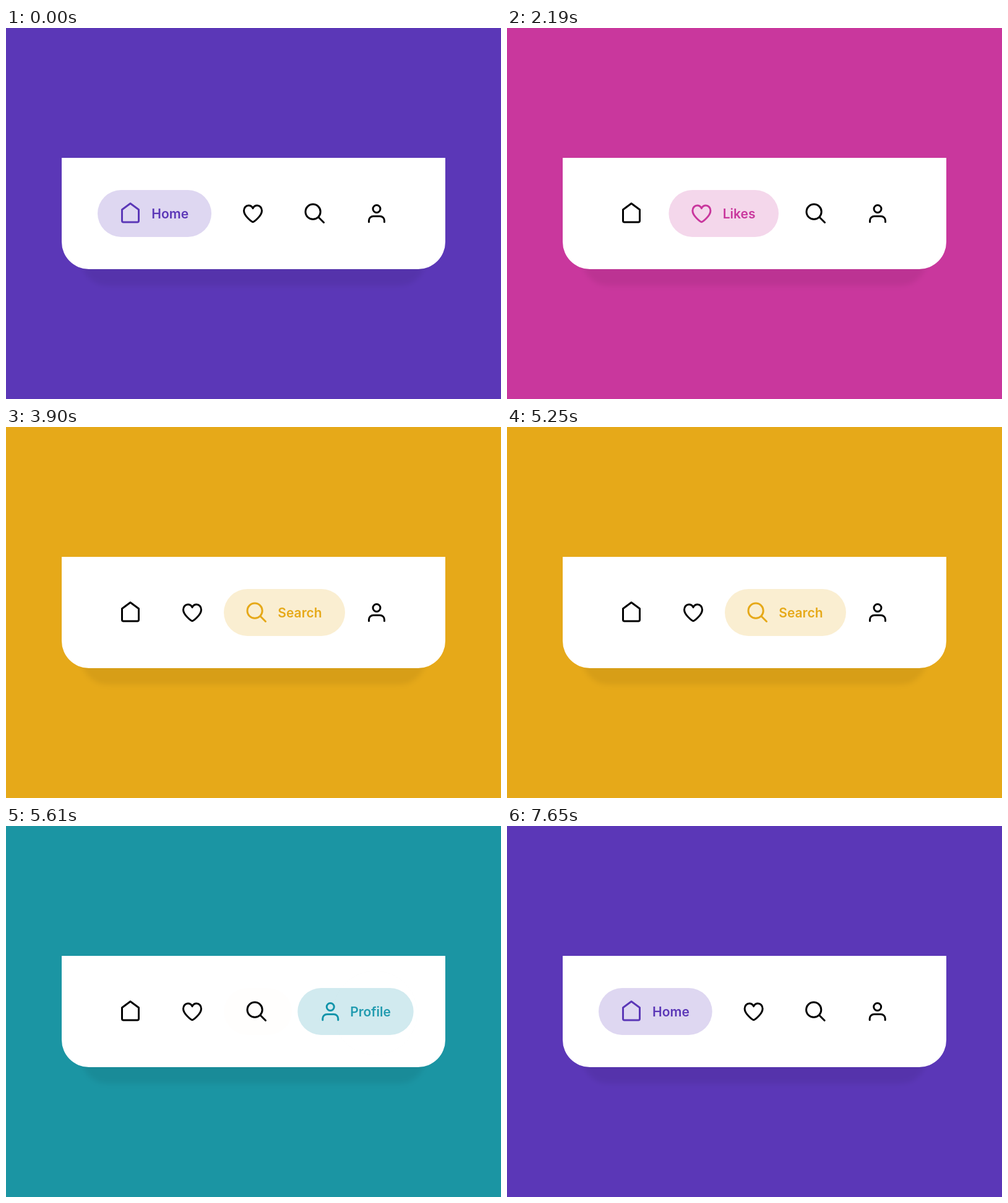
Write an HTML page that moves like this. It is 800x600 px and loops after 8.1 s.

```html
<!DOCTYPE html>
<html lang="en">
<head>
<meta charset="utf-8">
<title>Tab bar</title>
<style>
  html, body { margin: 0; width: 100%; height: 100%; overflow: hidden; }
  svg { display: block; width: 800px; height: 600px; }
  .icon { fill: none; stroke-width: 3; stroke-linecap: round; stroke-linejoin: round; }
  text { font: 600 21px Inter, sans-serif; }
</style>
</head>
<body>
<svg id="stage" viewBox="0 0 800 600">
  <defs>
    <filter id="soft" x="-10%" y="-30%" width="120%" height="160%"><feGaussianBlur stdDeviation="4"/></filter>
  </defs>
  <rect id="back" width="800" height="600"/>
  <rect x="121" y="250" width="558" height="167" rx="44" fill="rgb(30,0,20)" fill-opacity=".065" filter="url(#soft)"/>
  <path d="M90 210H710V346a44 44 0 0 1-44 44H134a44 44 0 0 1-44-44Z" fill="#fff"/>
</svg>
<script>
const LOOP = 8100, MOVE = 500, TINT = 330, SMALL = 106, LEAD = 6;

const tabs = [
  { name: 'Home', color: [91, 55, 183], width: 184,
    path: 'M0-16.2 13.5-6.2V11.8a2.2 2.2 0 0 1-2.2 2.2H-11.3a2.2 2.2 0 0 1-2.2-2.2V-6.2Z' },
  { name: 'Likes', color: [201, 55, 157], width: 177.6,
    path: 'M0 13.7C-1.5 13.7-14.5 4-14.5-4.5C-14.5-9.5-11-13-7-13C-4-13-1.5-11.4 0-8.4C1.5-11.4 4-13 7-13C11-13 14.5-9.5 14.5-4.5C14.5 4 1.5 13.7 0 13.7Z' },
  { name: 'Search', color: [230, 169, 25], width: 196,
    path: 'M-15-2.8a12.1 12.1 0 1 0 24.2 0a12.1 12.1 0 1 0-24.2 0M6 6L14.5 14.5' },
  { name: 'Profile', color: [17, 148, 170], width: 191.4,
    path: 'M-6-7.5a6 6 0 1 0 12 0a6 6 0 1 0-12 0M-12.5 13.8v-2.3a7 7 0 0 1 7-7h11a7 7 0 0 1 7 7v2.3' }
];

// icon centres for each selected tab
const layout = [
  [201, 399, 499, 599],
  [201, 314.4, 499, 599],
  [201, 301, 405, 599],
  [201, 301, 405, 520.6]
];

const taps = [
  { at: 1680, from: 0, to: 1 },
  { at: 3390, from: 1, to: 2 },
  { at: 5250, from: 2, to: 3 },
  { at: 7200, from: 3, to: 0 }
];

const stage = document.getElementById('stage');
const back = document.getElementById('back');

function add(tag, attrs) {
  const el = document.createElementNS('http://www.w3.org/2000/svg', tag);
  set(el, attrs);
  return stage.appendChild(el);
}
function set(el, attrs) {
  for (const key in attrs) el.setAttribute(key, attrs[key]);
}

const clamp = v => Math.min(1, Math.max(0, v));
const mix = (a, b, p) => a + (b - a) * p;
const rgb = c => `rgb(${c.map(Math.round)})`;
const blend = (a, b, p) => rgb(a.map((v, i) => mix(v, b[i], p)));

// cubic-bezier(.4, 0, .2, 1)
function ease(x) {
  x = clamp(x);
  if (x === 0 || x === 1) return x;
  let lo = 0, hi = 1, s;
  for (let i = 0; i < 24; i++) {
    s = (lo + hi) / 2;
    const at = 1.2 * (1 - s) ** 2 * s + 0.6 * (1 - s) * s * s + s ** 3;
    if (at < x) lo = s; else hi = s;
  }
  return 3 * (1 - s) * s * s + s ** 3;
}

for (const tab of tabs) {
  tab.pill = add('rect', { y: 262, height: 76, rx: 38, fill: rgb(tab.color) });
}
const ring = add('circle', { fill: 'none', 'stroke-opacity': 0.1 });
for (const tab of tabs) {
  tab.label = add('text', { y: 307.5, fill: rgb(tab.color) });
  tab.label.textContent = tab.name;
  tab.icon = add('path', { class: 'icon', d: tab.path });
}

function drawRing(tap, t) {
  const p = 1 - (1 - clamp(t / MOVE)) ** 5;
  const radius = 68 * p;
  const band = Math.min(radius, 65 * (1 - p));
  set(ring, {
    cx: layout[tap.from][tap.to] - 2.3 * p,
    cy: 300 + 2.3 * p,
    r: Math.max(0, radius - band / 2),
    'stroke-width': band,
    stroke: rgb(tabs[tap.to].color),
    visibility: t > 0 && t < MOVE ? 'visible' : 'hidden'
  });
}

function draw(time) {
  const tap = taps.filter(s => s.at <= time).pop();
  const { from, to } = tap || { from: 0, to: 0 };
  const t = tap ? time - tap.at + LEAD : 0;
  const p = tap ? ease(t / MOVE) : 1;
  const fade = ease(t / TINT);

  set(back, { fill: blend(tabs[from].color, tabs[to].color, p) });

  tabs.forEach((tab, i) => {
    const x = mix(layout[from][i], layout[to][i], p);
    let open = 0, tint = 0, text = 0;
    if (i === to) {
      open = p;
      tint = tap ? ease(t / 170) : 1;
      text = tap ? ease((t - 150) / TINT) : 1;
    } else if (i === from) {
      open = 1 - p;
      tint = text = 1 - fade;
    }
    set(tab.pill, { x: x - 53, width: mix(SMALL, tab.width, open), 'fill-opacity': 0.2 * open });
    set(tab.label, { x: x + 34.3 - 52 * (1 - open), opacity: text });
    set(tab.icon, { transform: `translate(${x} 300)`, stroke: blend([0, 0, 0], tab.color, tint) });
  });

  // brief flash inside the house when it is tapped
  const flash = tap && to === 0 ? 0.1 * clamp((40 - t) / 30) : 0;
  set(tabs[0].icon, { fill: flash ? rgb(tabs[0].color) : 'none', 'fill-opacity': flash });

  if (tap) drawRing(tap, t);
  else set(ring, { visibility: 'hidden' });
}

const start = performance.now();
function tick() {
  draw((performance.now() - start) % LOOP);
  requestAnimationFrame(tick);
}
tick();
</script>
</body>
</html>
```
